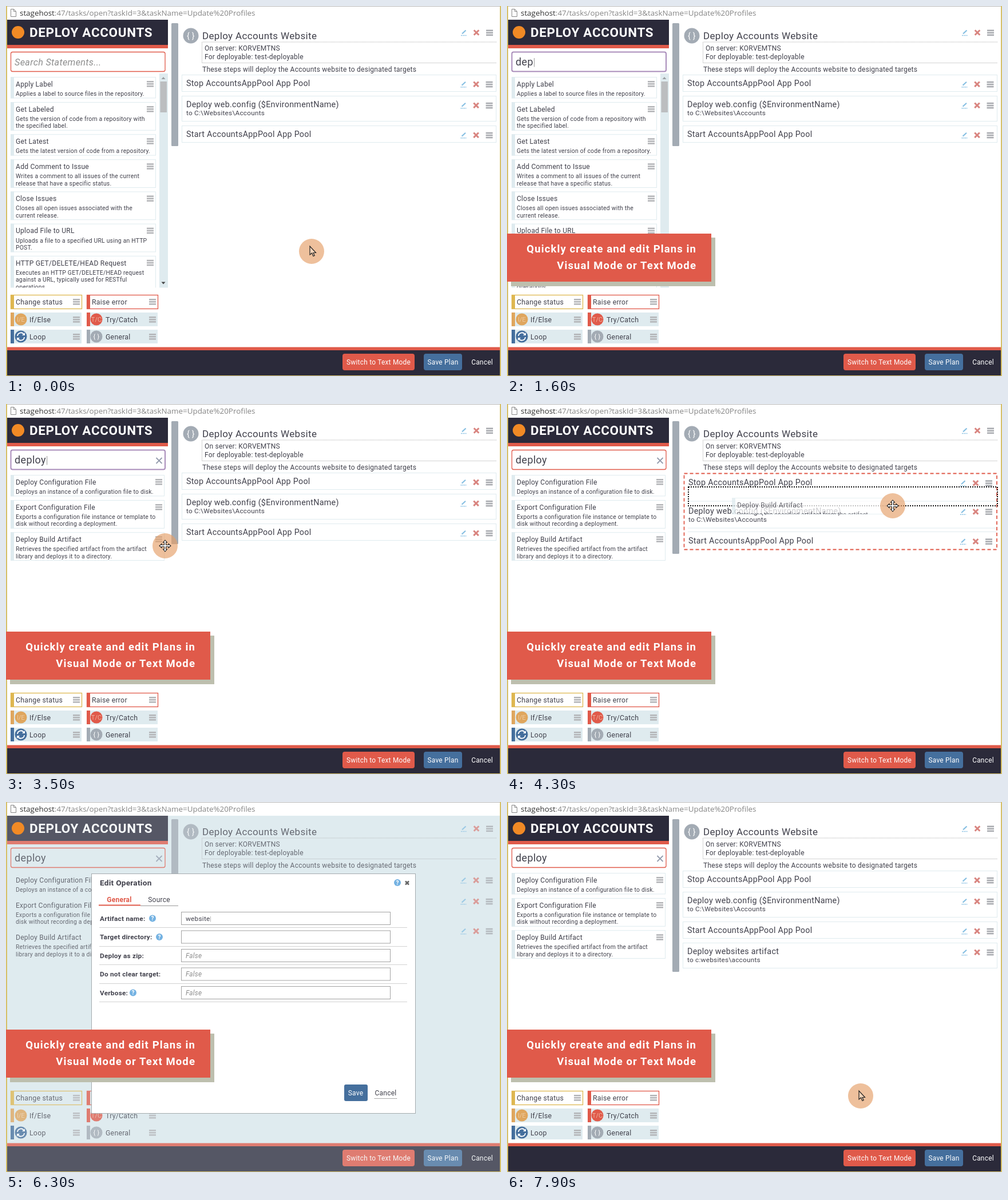
An HTML page that plays this animation: 865x647 px, repeating every 8000 ms.

```html
<!DOCTYPE html>
<html lang="en">
<head>
<meta charset="utf-8">
<title>Plan editor</title>
<style>
  html, body { margin: 0; width: 100%; height: 100%; overflow: hidden; background: #fff; }
  svg { display: block; width: 100vw; height: 100vh; font-family: Roboto, sans-serif; }
  text { letter-spacing: .02em; white-space: pre; }
</style>
</head>
<body>
<svg id="stage" viewBox="0 0 865 647"></svg>
<script>
const LOOP = 8000;
const RED = '#e05a4a', DARK = '#2b2a3a', PALE = '#dfebef', BLUE = '#456f9d',
      GRAY = '#a3abb4', INK = '#41414c', GOLD = '#deb750', TAN = '#dfa65e';

const STATEMENTS = [
  ['Apply Label', 'Applies a label to source files in the repository.'],
  ['Get Labeled', 'Gets the version of code from a repository with', 'the specified label.'],
  ['Get Latest', 'Gets the latest version of code from a repository.'],
  ['Add Comment to Issue', 'Writes a comment to all issues of the current', 'release that have a specific status.'],
  ['Close Issues', 'Closes all open issues associated with the', 'current release.'],
  ['Upload File to URL', 'Uploads a file to a specified URL using an HTTP', 'POST.'],
  ['HTTP GET/DELETE/HEAD Request', 'Executes an HTTP GET/DELETE/HEAD request', 'against a URL, typically used for RESTful', 'operations.']
];
const MATCHES = [
  ['Deploy Configuration File', 'Deploys an instance of a configuration file to disk.'],
  ['Export Configuration File', 'Exports a configuration file instance or template to', 'disk without recording a deployment.'],
  ['Deploy Build Artifact', 'Retrieves the specified artifact from the artifact', 'library and deploys it to a directory.']
];
const STEPS = [
  ['Stop AccountsAppPool App Pool'],
  ['Deploy web.config ($EnvironmentName)', 'to C:\\Websites\\Accounts'],
  ['Start AccountsAppPool App Pool'],
  ['Deploy websites artifact', 'to c:websites\\accounts']
];
// time, x, y, shape; a bare time hides the pointer
const POINTER = [
  [0, 534, 429, 'arrow'], [600, 330, 327, 'arrow'], [900, 126, 148, 'arrow'], [1200],
  [2800, 129, 133, 'arrow'], [3200, 265, 253, 'arrow'], [3500, 278, 248, 'move'],
  [3800, 472, 214, 'move'], [4300, 674, 178, 'move'], [4900, 668, 177, 'arrow'],
  [5500, 640, 204, 'beam'], [5700], [6700, 651, 236, 'beam'], [6900],
  [7700, 623, 517, 'hand'], [7900, 618, 514, 'arrow']
];

const between = (t, from, to) => t >= from && t < to;
const rect = (x, y, w, h, fill, extra = '') =>
  `<rect x="${x}" y="${y}" width="${w}" height="${h}" fill="${fill}" ${extra}/>`;
const frame = (x, y, w, h, color, extra = '') =>
  rect(x + .5, y + .5, w - 1, h - 1, 'none', `stroke="${color}" ${extra}`);
const line = (d, color, width = 1, extra = '') =>
  `<path d="${d}" fill="none" stroke="${color}" stroke-width="${width}" ${extra}/>`;
const circle = (x, y, r, fill, extra = '') =>
  `<circle cx="${x}" cy="${y}" r="${r}" fill="${fill}" ${extra}/>`;
const text = (x, y, str, size = 12, fill = INK, extra = '') =>
  `<text x="${x}" y="${y}" font-size="${size}" fill="${fill}" ${extra}>${str}</text>`;
const bold = 'font-weight="700"', middle = 'text-anchor="middle"';
const caret = '<tspan font-weight="100" fill="#222">|</tspan>';

const burger = (x, y, color = '#b4b5b8') =>
  [-5, -1, 3].map(dy => rect(x - 6, y + dy, 12, 2.6, color)).join('');
const cross = (x, y, r, color, width) =>
  line(`M${x - r} ${y - r}l${2 * r} ${2 * r}m0 ${-2 * r}l${-2 * r} ${2 * r}`, color, width);
const tools = (x, y) =>
  line(`M${x - 3} ${y + 2}l6.5 -6`, '#86bfe2', 2.2) +
  line(`M${x - 5} ${y + 5}h10`, '#86bfe2', 1.4, 'stroke-dasharray="2 1"') +
  cross(x + 22, y, 4.3, '#d98580', 3) + burger(x + 45, y, '#a9abb0');
const braces = (x, y, r, size) =>
  circle(x, y, r, GRAY) + text(x, y + size * .34, '{ }', size, '#fff', middle);

function statementList(items, width, hovered) {
  let y = 124;
  return items.map(([title, ...lines], i) => {
    const h = 25 + lines.length * 12.4;
    const item = frame(8, y, width, h, PALE) + rect(8, y, 6, h, PALE) +
      text(17, y + 16.8, title, 12.1) +
      lines.map((s, n) => text(17, y + 33 + n * 12.4, s, 10.4)).join('') +
      burger(width - 2, y + 12, i === hovered ? '#8b8c90' : undefined);
    y += h + (lines.length > 1 ? 6.4 : 6.6);
    return item;
  }).join('');
}

const scrollbar = () =>
  rect(268, 118, 15, 375, PALE) + rect(269.5, 132, 11.5, 54, '#bcbec0') +
  '<path d="M271.5 128l3.5-4 3.5 4z" fill="#9a9fa3"/><path d="M271.5 482.500l3.5 4 3.5-4z" fill="#444"/>';

function searchBox(t) {
  const focused = between(t, 1200, 3800);
  const typed = t >= 2200 ? 'deploy' : t >= 1600 ? 'dep' : '';
  const caretOn = focused && !between(t, 2600, 3200);
  return rect(8.5, 80.5, 269.5, 34, 'none',
      `rx="3" stroke="${focused ? '#a98cba' : RED}" stroke-width="${focused ? 2 : 1.3}"`) +
    (typed ? '' : text(15, 104, 'Search Statements...', 16.2, '#8e8e8e', 'font-style="italic"')) +
    text(15, 104, typed + (caretOn ? caret : ''), 18) +
    (t >= 2200 ? cross(267.500, 99, 5, '#949cad', 1.8) : '');
}

function block(x, y, label, color, icon) {
  const body = icon ? rect(x, y, 124, 24, PALE) : frame(x, y, 125, 25, color, 'stroke-width="1.3"');
  return body + rect(x, y, 6, icon ? 24 : 25, color) + (icon || '') +
    text(x + (icon ? 33 : 9), y + 16.5, label, 12.3) + burger(x + 115, y + 12);
}
const badge = (x, label, color) => circle(x, 548, 10.5, color) +
  text(x, 552, label, 11, '#f6dcc4', `${middle} font-weight="300"`);
const loopBadge = () => circle(26, 578, 10.5, BLUE) +
  line('M20 577a6 6 0 0 1 11 -3M32 579a6 6 0 0 1 -11 3', '#fff', 1.8) +
  '<path d="M33 571v5h-5zM19 585v-5h5z" fill="#fff"/>';

const blocks = () =>
  block(8, 505, 'Change status', GOLD) + block(141, 505, 'Raise error', RED) +
  block(8, 536, 'If/Else', TAN, badge(26, 'I/E', TAN)) +
  block(141, 536, 'Try/Catch', RED, badge(158, 'T/C', RED)) +
  block(8, 566, 'Loop', BLUE, loopBadge()) +
  block(141, 566, 'General', GRAY, braces(158, 578, 10.5, 11));

const stepRow = ([title, sub], x, y, toolX) =>
  text(x, y, title, 14.3) + (sub ? text(x, y + 14, sub, 11.8) : '') + tools(toolX, y - 3.2);

function dropZone() {
  return stepRow(STEPS[0], 317, 141.5, 797) + stepRow(STEPS[1], 317, 191.5, 797) +
    stepRow(STEPS[2], 317, 243.5, 797) +
    line('M316 170H855M316 217H855M316 223.500H855', PALE) +
    frame(309, 121, 547.5, 134, RED, 'stroke-width="1.800" stroke-dasharray="6 4"') +
    rect(317, 145, 540, 33, 'none', 'stroke="#111" stroke-width="2" stroke-dasharray="2 2"');
}

function plan(t) {
  const dropping = between(t, 4300, 4900);
  const count = t >= 7900 ? 4 : 3;
  const tops = [120, 157, 209, 246];
  const rows = STEPS.slice(0, count).map((step, i) =>
    frame(307, tops[i], 550, step[1] ? 45 : 30, PALE) + stepRow(step, 315, tops[i] + 20, 799.5)).join('');
  return rect(289, 30, 12, dropping ? 232 : count === 4 ? 267 : 215, GRAY, 'rx="1.5"') +
    braces(323, 52, 13.5, 14) + text(343, 58, 'Deploy Accounts Website', 17) + tools(800, 46.500) +
    line('M857 63H342.500V99.500H857', '#a9a9a9', 1, 'stroke-dasharray="1 1"') +
    text(347, 78, 'On server: KORVEMTNS') + text(347, 93, 'For deployable: test-deployable') +
    text(343, 115, 'These steps will deploy the Accounts website to designated targets', 12) +
    (dropping ? dropZone() : rows);
}

const footer = () =>
  rect(2, 596.5, 861, 6, RED) + rect(2, 602, 861, 44, DARK) +
  rect(588, 608, 126, 29, RED, 'rx="4"') + text(651, 627, 'Switch to Text Mode', 11.9, '#fff', middle) +
  rect(730, 608, 67, 29, BLUE, 'rx="4"') + text(763.5, 627, 'Save Plan', 11.9, '#fff', middle) +
  text(832, 627, 'Cancel', 11.9, '#fff', middle);

function page(t) {
  const filtered = t >= 2200;
  return rect(2, 24, 281, 44, DARK) + rect(2, 68, 281, 6, RED) +
    text(41, 54, 'DEPLOY ACCOUNTS', 22.4, '#fff', `${bold} style="letter-spacing:.7px"`) +
    searchBox(t) +
    `<g clip-path="url(#list)">${filtered ? statementList(MATCHES, 269)
      : statementList(STATEMENTS, 254, between(t, 900, 1200) ? 1 : -1) + scrollbar()}</g>` +
    blocks() + plan(t) + footer();
}

function ghost(x, y) {
  return `<g opacity=".75"><g clip-path="url(#ghost)" transform="translate(${x} ${y})">` +
    rect(0, 0, 269, 29, '#fff') + rect(0, 0, 6, 29, PALE) + line('M0 .5H269M0 28.500H269', PALE) +
    text(9, 16.500, MATCHES[2][0], 12.1) + text(9, 32.500, MATCHES[2][1], 10.4) + '</g></g>';
}

const help = (x, y) => circle(x, y, 6, '#74b2e2') + text(x, y + 3.5, '?', 10, '#fff', `${bold} ${middle}`);

function typed(str, t, start, steps) {
  const done = Math.min(steps, Math.max(0, Math.floor((t - start) / 200) + 1));
  return str.slice(0, Math.ceil(str.length * done / steps));
}

function dialog(t) {
  const editing = between(t, 5500, 7700);
  const values = [
    typed('websites', t, 5700, 5) + (between(t, 5500, 6700) ? caret : ''),
    typed('c:websites\\accounts', t, 6900, 4) + (between(t, 6700, 7700) ? caret : '')
  ];
  const fields = [['Artifact name:', 256], ['Target directory:', 268], ['Deploy as zip:'],
    ['Do not clear target:'], ['Verbose:', 222]];
  const rows = fields.map(([label, helpX], i) => {
    const y = 203.5 + i * 32.5;
    return text(164, y + 4, label, 11.8, INK, bold) + (helpX ? help(helpX, y) : '') +
      frame(306, y - 11.5, 366, 23, '#a2a2a2') +
      (i < 2 ? text(314, y + 4, values[i], 11.8) : text(314, y + 4, 'False', 11.8, '#8d8d8d', 'font-style="italic"')) +
      line(`M163 ${Math.floor(y + 16) + .5}H701`, '#d2d2d2');
  }).join('');
  return rect(149, 125, 567, 420, '#fff') + frame(149, 125, 567, 420, '#a5abae') +
    text(164, 146, 'Edit Operation', 13.6, INK, bold) + help(684, 141) + cross(701, 141.5, 3, '#666', 2.6) +
    text(198, 175, 'General', 12, RED, `${bold} ${middle}`) + text(267.500, 175, 'Source', 12, INK, middle) +
    line('M162 180.500H235', RED, 1.8) + line('M235 181.500H301', '#999') + rows +
    rect(591, 494, 41, 29, t >= 7700 ? '#3a5d86' : BLUE,
      `rx="3" ${editing ? '' : 'stroke="#71a7ec" stroke-width="2"'}`) +
    text(611, 513, 'Save', 12, '#fff', middle) + text(663.500, 513, 'Cancel', 12, INK, middle) +
    line('M644 518.500H683', '#555', 1, 'stroke-dasharray="1 1"');
}

function banner(t) {
  const words = (y, str) => text(331, y, str, 18.5, '#fff', `${bold} text-anchor="end" style="letter-spacing:1.1px"`);
  return `<g transform="translate(${t < 900 ? -180 : 0} 0)">` +
    rect(7, 405, 357, 85, '#bdbfae') + rect(0, 398, 357, 84, RED) +
    words(431, 'Quickly create and edit Plans in') + words(460, 'Visual Mode or Text Mode') + '</g>';
}

const SHAPES = {
  arrow: '<path d="M-3 -9V6L.5 3 3 8.500 5.200 7.500 3 2.500H7.500Z" fill="#f3d3b8" stroke="#222" stroke-width="1.2"/>',
  move: '<path d="M0 -10l3.500 4h-2v4.500H6v-2l4 3.500-4 3.500v-2H1.500V6h2L0 10l-3.500-4h2V1.500H-6v2L-10 0l4-3.500v2h4.500V-6h-2z" fill="#fff" stroke="#222" stroke-width="1.100"/>',
  beam: '<path d="M-3 -8H3M0 -8V8M-3 8H3" fill="none" stroke="#333" stroke-width="1.2"/>',
  hand: '<path d="M-3 2V-9q1.500-2.500 3 0V-4q1.500-1.500 3 0q1.500-1.500 3 .500q2-1 2.500 1V3L7 8H-2L-7 1q0-3 4 1z" fill="#f3d3b8" stroke="#222" stroke-width="1.2"/>'
};

function pointer(t) {
  const [, x, y, shape] = POINTER.filter(stop => stop[0] <= t).pop();
  if (!shape) return '';
  return `<g transform="translate(${x} ${y})">${circle(0, 0, 22, '#e5a06a', 'opacity=".66"')}${SHAPES[shape]}</g>`;
}

const clips = '<clipPath id="list"><rect x="2" y="116" width="282" height="376.500"/></clipPath>' +
  '<clipPath id="ghost"><rect width="269" height="29"/></clipPath>';

const addressBar = () =>
  rect(0, 0, 865, 24, '#fff') + line('M0 .5H865', '#b9b9b9') +
  line('M8.500 5.500h5l4 4v9h-9zM13.500 5.500v4h4', '#888') +
  text(24, 17, 'stagehost<tspan fill="#858585">:47/tasks/open?taskId=3&amp;taskName=Update%20Profiles</tspan>',
    13.4, '#333', 'font-family="Open Sans, sans-serif" style="letter-spacing:0"');

function render(t) {
  const modal = between(t, 4900, 7900);
  return clips + rect(0, 0, 865, 647, modal ? PALE : '#fff') +
    `<g opacity="${modal ? .76 : 1}">${page(t)}</g>` +
    circle(21, 46, 11, '#f18a25') + addressBar() +
    line('M1 0V647M864 0V647', '#d6c069', 2) + line('M0 646.500H865', '#d6c069') +
    (between(t, 3800, 4300) ? ghost(142, 200) : between(t, 4300, 4900) ? ghost(393, 164) : '') +
    (modal ? dialog(t) : '') + (t >= 600 ? banner(t) : '') + pointer(t);
}

const stage = document.getElementById('stage');
let shown = '';
function tick() {
  const picture = render(performance.now() % LOOP);
  if (picture !== shown) stage.innerHTML = shown = picture;
  requestAnimationFrame(tick);
}
tick();
</script>
</body>
</html>
```
